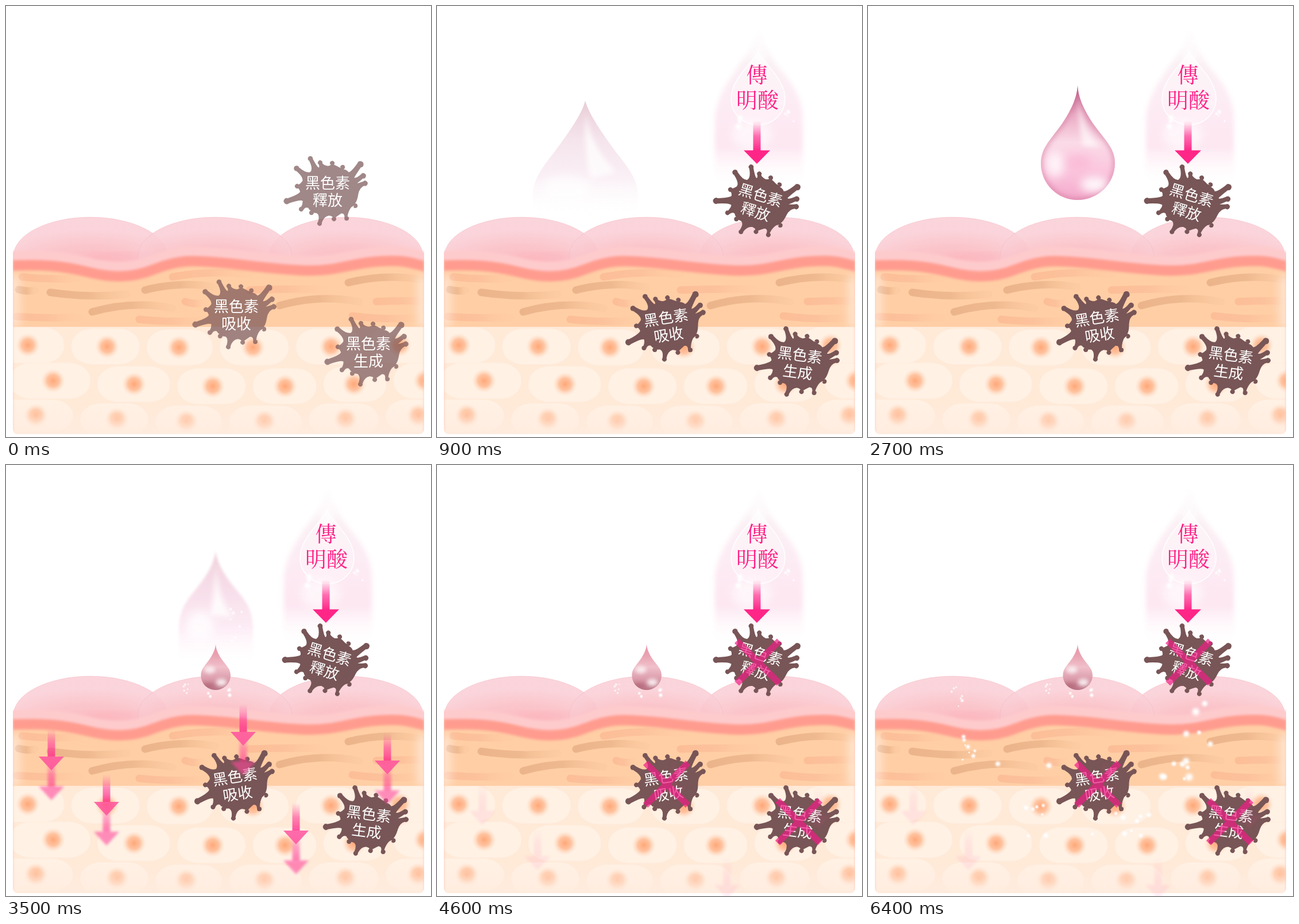
An HTML page for the animation above (7400 ms loop, 740 by 751 pixels).

```html
<!DOCTYPE html>
<html lang="zh-Hant">
<head>
<meta charset="utf-8">
<title>傳明酸</title>
<style>
html, body { margin: 0; width: 100%; height: 100%; overflow: hidden; background: #fff; }
svg { display: block; width: 740px; height: 751px; }
.label { font: 26px "Noto Sans CJK TC", "Noto Sans CJK SC", "Noto Sans CJK JP", sans-serif; fill: #fff; text-anchor: middle; }
.title { font: 500 37px "Noto Serif CJK TC", "Noto Serif CJK SC", "Noto Serif CJK JP", "Noto Serif", serif; fill: #ff1f85; text-anchor: middle; }
</style>
</head>
<body>
<svg id="stage" viewBox="0 0 740 751" xmlns="http://www.w3.org/2000/svg"></svg>
<script>
const LOOP = 7400;
const stage = document.getElementById('stage');
const $ = id => document.getElementById(id);
const group = (id, body, attrs = '') => `<g id="${id}" ${attrs}>${body}</g>`;

// Stops: "color" or "color/opacity", evenly spaced.
const stops = list => list.map((s, i) => {
  const [color, alpha = 1] = s.split('/');
  return `<stop offset="${i / (list.length - 1)}" stop-color="${color}" stop-opacity="${alpha}"/>`;
}).join('');
const across = (id, ...s) => `<linearGradient id="${id}">${stops(s)}</linearGradient>`;
const down = (id, ...s) => `<linearGradient id="${id}" x2="0" y2="1">${stops(s)}</linearGradient>`;
const radial = (id, attrs, ...s) => `<radialGradient id="${id}" ${attrs}>${stops(s)}</radialGradient>`;
const blur = n => `<filter id="blur${n}" x="-60%" y="-60%" width="220%" height="220%"><feGaussianBlur stdDeviation="${n}"/></filter>`;
const wipe = (id, ...s) => `<linearGradient id="${id}" gradientUnits="userSpaceOnUse" x1="0" x2="0">${stops(s)}</linearGradient>
  <mask id="${id}Mask" maskUnits="userSpaceOnUse" x="0" y="0" width="740" height="751"><rect width="740" height="751" fill="url(#${id})"/></mask>`;

const defs = `<defs>
  ${[1, 2, 4, 8].map(blur).join('')}
  ${radial('dome', 'cx=".5" cy=".85" r=".62"', '#fbb6bb', '#fabfc5', '#fad0d7')}
  ${radial('nucleus', '', '#ffa777', '#ffb78e/.8', '#ffd9bf/0')}
  ${radial('glow', '', '#fff', '#fff/.75', '#fff/.2', '#fff/0')}
  ${across('dark', '#ecb48a', '#efb98f', '#f8c59b/.3')}
  ${across('light', '#fcbe97', '#fcc29c', '#ffcaa2/.3')}
  ${down('floor', '#ffecdf/0', '#ffecdf/.9')}
  ${down('beam', '#fff', '#fbf0f4', '#fdebf4', '#fde6f1', '#fff/0')}
  ${down('shaft', '#ff5fa8/0', '#ff4a9d/.8', '#ff2688')}
  ${down('pale', '#e9ccd7', '#f5e4eb', '#faf0f6', '#fff/0')}
  ${down('mist', '#f0cfda', '#f7dde8', '#fdebf5', '#fff/0')}
  ${down('rose', '#b94f7c', '#eaa9c3', '#fbdbe7', '#fbc6de', '#f3a9cb')}
  ${down('deep', '#ee8fa5', '#e9a3b2', '#f0c0ca', '#dc9dac', '#bb7686')}
  ${wipe('wipeOut', '#000', '#fff')}
  ${wipe('wipeIn', '#fff', '#000')}
  <clipPath id="block"><path d="M12 400H728V736Q728 746 718 746H22Q12 746 12 736Z"/></clipPath>
  <path id="drop" d="M365 138C366 158 374 178 392 205C412 233 430 247 430 274C430 310 400 338 365 338S301 310 301 274C301 247 318 233 338 205C356 178 364 158 365 138Z"/>
  <clipPath id="inDrop"><use href="#drop"/></clipPath>
  <g id="arrow"><path d="M-6.5-72H6.5V-23H-6.5Z" fill="url(#shaft)"/><path d="M-22-24H22L0 0Z" fill="#ff4a9c"/></g>
</defs>`;

function random(seed) {
  return () => {
    seed = (seed * 16807) % 2147483647;
    return seed / 2147483647;
  };
}

// Glowing dots strewn around a centre.
function strew(x, y, w, h, count, size) {
  const rnd = random(Math.round(x * 31 + y * 7));
  rnd();
  let out = '';
  for (let i = 0; i < count; i++) {
    const cx = x + (rnd() * 2 - 1) * w, cy = y + (rnd() * 2 - 1) * h;
    out += `<circle cx="${cx.toFixed(1)}" cy="${cy.toFixed(1)}" r="${(size * (.5 + .8 * rnd())).toFixed(1)}" fill="url(#glow)"/>`;
  }
  return out;
}

const shine = (x, y, rx, ry, alpha, color = '#fff') =>
  `<ellipse cx="${x}" cy="${y}" rx="${rx}" ry="${ry}" fill="${color}" opacity="${alpha}" filter="url(#blur8)"/>`;

// Nucleus positions fix the cells: each wall lies midway between neighbours.
function cellRow(xs, y, sag, half) {
  return xs.map((x, i) => {
    const cy = y + sag * Math.sin(Math.PI * i / 5);
    const l = i ? (xs[i - 1] + x) / 2 + 7 : x - 75;
    const r = i < 5 ? (x + xs[i + 1]) / 2 - 6 : x + 75;
    return `<rect x="${l}" y="${cy - half}" width="${r - l}" height="${half * 2}" rx="36" ry="29" fill="#fff1e4" stroke="#ffeee0"/>
      <circle cx="${x}" cy="${cy}" r="21" fill="url(#nucleus)"/>`;
  }).join('');
}

function skin() {
  const dome = x => `<path d="M${x - 134} 436A134 68 0 0 1 ${x + 134} 436V462H${x - 134}Z"
    fill="url(#dome)" fill-opacity=".9" stroke="#f3b3c0" stroke-opacity=".5"/>`;
  const wave = 'M0 452C60 448 100 452 140 462S215 475 260 457S330 443 370 446S480 460 530 460S600 447 650 444S710 448 740 456';
  const band = (dy, width, color) => `<path transform="translate(0 ${dy})" d="${wave}"
    fill="none" stroke="${color}" stroke-width="${width}" filter="url(#blur2)"/>`;
  const fibre = paint => ([x, y, len, bend]) =>
    `<path d="M${x} ${y}q${len / 2} ${bend} ${len} ${bend / 3}" stroke="url(#${paint})"/>`;
  const light = [[28, 472, 100, 6], [290, 472, 135, -12], [424, 495, 130, -3], [232, 546, 113, 6],
    [18, 541, 110, 4], [312, 515, 32, 6], [645, 515, 90, -2], [603, 540, 120, 8]];
  const dark = [[22, 494, 28, 4], [77, 499, 133, 10], [150, 533, 140, -20], [242, 495, 122, -16],
    [476, 522, 139, -20], [596, 482, 126, -16]];
  return dome(147) + dome(592) + dome(364) + shine(185, 438, 52, 5, .5, '#ff9fac') +
    `<g clip-path="url(#block)">
      ${band(-14, 20, '#fecbcc')}
      <path d="${wave}V560H0Z" fill="#ffcea5"/>
      <g fill="none" stroke-width="13" stroke-linecap="round">
        ${light.map(fibre('light')).join('')}${dark.map(fibre('dark')).join('')}</g>
      ${band(1, 18, '#ff9c8f')}
      <path d="M12 470V560M728 470V560" stroke="#fff" stroke-width="24" opacity=".45" filter="url(#blur8)"/>
      <path d="M0 559H740V751H0Z" fill="#ffe9d7"/>
      <svg y="559" width="740" height="192" viewBox="0 559 740 192">
        ${cellRow([38, 176, 301, 430, 566, 685], 591, 4, 31)}
        ${cellRow([82, 223, 360, 486, 606, 730], 653, 10, 31)}
        ${cellRow([52, 193, 314, 450, 591, 718], 714, 11, 28)}
      </svg>
      <rect x="12" y="690" width="716" height="56" fill="url(#floor)"/>
      <path d="M12 440V746M728 440V746" stroke="#ffc9bd" stroke-width="3" opacity=".6" filter="url(#blur1)"/>
    </g>`;
}

// Blob with knobbed spikes; tips run clockwise from the left.
function splatPath() {
  const tips = [[-71, 17], [-53, -9], [-54, -40], [-30, -57], [-13, -50], [8, -49], [26, -42], [57, -47],
    [62, -27], [65, -14], [48, 25], [33, 47], [11, 48], [-14, 56], [-28, 37], [-46, 31]];
  const core = (a, k = 1) => [3 + 53 * k * Math.cos(a), 45 * k * Math.sin(a) - 1];
  const fmt = p => p.map(v => v.toFixed(1)).join(' ');
  const angles = tips.map(([x, y]) => Math.atan2(y, x));
  const valley = i => {
    const a = angles[i], b = angles[(i + 1) % tips.length];
    return core(a + ((b - a + 2 * Math.PI) % (2 * Math.PI)) / 2, .96);
  };
  let d = 'M' + fmt(valley(tips.length - 1));
  tips.forEach(([x, y], i) => {
    const c = Math.cos(angles[i]), s = Math.sin(angles[i]);
    const r = 4 + Math.max(0, Math.hypot(x, y) - 62) / 8;
    const [bx, by] = core(angles[i]);
    const side = (px, py, w) => [px - s * w, py + c * w];
    const nx = x - c * r * .5, ny = y - s * r * .5, w = r * .85;
    d += `Q${fmt(side(bx, by, -w))} ${fmt(side(nx, ny, -w))}A${r} ${r} 0 1 1 ${fmt(side(nx, ny, w))}
      Q${fmt(side(bx, by, w))} ${fmt(valley(i))}`;
  });
  return d + 'Z';
}

const SPLAT = splatPath();
const splat = (x, y, turn, word, alpha = 1) => `<g transform="translate(${x} ${y}) rotate(${turn})">
  <path d="${SPLAT}" fill="#785556" fill-opacity="${alpha}"/>
  <text class="label" y="-5.5">黑色素</text><text class="label" y="24.5">${word}</text></g>`;

const beam = `<path d="M560 33C563 62 582 92 606 120C628 148 637 170 637 200V315H484V200C484 170 500 140 522 108C546 76 557 62 560 33Z"
    fill="url(#beam)" filter="url(#blur4)"/>
  ${shine(560, 95, 9, 40, .8)}${shine(548, 225, 34, 26, .6)}
  <path d="M559 79C563 95 606 125 606 161C606 188 585 207 559 207S512 188 512 161C512 125 555 95 559 79Z"
    fill="#fff" fill-opacity=".25" stroke="#fff" stroke-width="1.5"/>
  ${strew(611, 189, 10, 12, 5, 4)}${strew(525, 230, 25, 35, 3, 7)}
  <path d="M550.5 200H563.5V253H550.5Z" fill="url(#shaft)"/><path d="M534 251.5H580L557 275Z" fill="#ff2688"/>
  <text class="title" x="557" y="133.5">傳</text><text class="title" x="558" y="177.5">明酸</text>`;

const leftDrop = `<path d="M258 165C265 190 290 225 312 255C336 285 350 305 350 330V366H167V330C167 305 180 285 204 255C226 225 252 190 258 165Z" fill="url(#pale)"/>
  <path d="M260 185C262 225 285 260 310 290L268 300C258 265 256 220 260 185Z" fill="#fff" opacity=".75" filter="url(#blur4)"/>
  ${shine(225, 318, 42, 22, .7)}`;

const gloss = `<g clip-path="url(#inDrop)">
  <use href="#drop" fill="none" stroke="#cf6f97" stroke-width="7" opacity=".6" filter="url(#blur4)"/>
  <path d="M367 152C370 195 385 225 404 246L374 244C368 215 365 185 367 152Z" fill="#fff" opacity=".6" filter="url(#blur4)"/>
  ${shine(326, 276, 16, 22, .75)}${shine(366, 272, 22, 14, .6, '#fbb2d3')}${shine(394, 311, 24, 13, .9)}</g>`;

const mistDrop = `<path d="M365 150C368 175 385 198 405 222C424 244 430 262 430 285V350H301V285C301 262 308 244 326 222C346 198 362 175 365 150Z" fill="url(#mist)" filter="url(#blur2)"/>
  <path d="M366 168C366 205 375 240 395 265L355 262C362 230 364 200 366 168Z" fill="#fff" opacity=".8" filter="url(#blur4)"/>
  ${shine(338, 280, 24, 26, .8)}${strew(403, 278, 16, 32, 7, 5)}`;

const smallDrop = `<g transform="translate(219 256.8) scale(.4)"><use href="#drop" fill="url(#deep)"/>
  <g clip-path="url(#inDrop)">${shine(340, 250, 24, 16, .7)}${shine(390, 305, 24, 16, .8)}${shine(330, 320, 30, 14, .5, '#a85a6c')}</g></g>` +
  strew(316, 391, 10, 9, 6, 3) + strew(370, 398, 24, 7, 7, 4);

const arrows = dy => [[79, 532], [175, 611], [413, 489], [505, 661], [664, 539]]
  .map(([x, y]) => `<use href="#arrow" x="${x}" y="${y + dy}"/>`).join('');

const cross = (id, x, y) => group(id, `<path d="M${x - 37} ${y - 37}l74 74m0-74l-74 74" stroke="#f01f86" stroke-width="11.5" opacity=".7"/>`);

const sparkles = [[156, 405, 11, 20, 7, 4], [173, 494, 14, 24, 8, 5], [227, 522, 2, 2, 1, 9], [317, 523, 3, 3, 1, 12],
  [292, 620, 18, 28, 7, 7], [440, 628, 50, 26, 9, 8], [550, 525, 45, 22, 8, 9], [570, 450, 28, 40, 5, 11]]
  .map(s => strew(...s)).join('');

stage.innerHTML = defs + skin() +
  group('beamLayer', beam) +
  group('leftLayer', leftDrop, 'mask="url(#wipeOutMask)"') +
  group('mistLayer', mistDrop) +
  group('bigLayer', `<use href="#drop" fill="url(#rose)"/>${gloss}`, 'mask="url(#wipeInMask)"') +
  group('smallLayer', smallDrop) +
  group('before', splat(560, 323, 0, '釋放', .7) + splat(401, 538, 0, '吸收', .7) + splat(631, 603, 0, '生成', .7)) +
  group('after', splat(559, 344, 17, '釋放') + splat(401, 558, -9, '吸收') + splat(630, 623, 7.5, '生成')) +
  group('arrowsHigh', arrows(0)) +
  group('arrowsMid', arrows(52), 'filter="url(#blur2)"') +
  group('arrowsLow', arrows(95), 'filter="url(#blur2)"') +
  cross('crossRelease', 559, 343.5) + cross('crossAbsorb', 400, 556) + cross('crossMake', 630, 621.5) +
  group('sparkleLayer', sparkles);

// Keys: time, value, time, value ...
function track(t, ...keys) {
  if (t <= keys[0]) return keys[1];
  for (let i = 2; i < keys.length; i += 2) {
    if (t <= keys[i]) {
      const k = (t - keys[i - 2]) / (keys[i] - keys[i - 2]);
      return keys[i - 1] + (keys[i + 1] - keys[i - 1]) * k;
    }
  }
  return keys[keys.length - 1];
}

const FADES = {
  before: [0, 1, 200, .52, 500, 0],
  after: [0, 0, 200, .55, 500, 1],
  beamLayer: [200, 0, 500, 1],
  leftLayer: [700, 0, 900, 1, 1300, .85, 1900, 0],
  bigLayer: [1900, 0, 2100, .35, 2700, 1, 3300, 0],
  mistLayer: [2700, 0, 3200, 1, 3500, .95, 3800, 0],
  smallLayer: [2700, 0, 3200, 1],
  arrowsHigh: [2800, 0, 3300, .9, 3500, .8, 4000, 0],
  arrowsMid: [3000, 0, 3500, .6, 3700, .7, 4200, 0],
  arrowsLow: [3500, 0, 3800, .4, 4200, .09],
  crossAbsorb: [4100, 0, 4200, 1],
  crossMake: [4200, 0, 4400, 1],
  crossRelease: [4400, 0, 4600, 1],
  sparkleLayer: [4600, 0, 5200, 1, 5800, .4, 6400, 1]
};

// The picture moves in holds of 100 or 200 ms.
function hold(t) {
  const fine = t < 500 || (t >= 3200 && t < 4200);
  const step = fine ? 100 : 200;
  const shift = t >= 500 && t < 2800 ? 100 : 0;
  return Math.floor((t - shift) / step) * step + shift;
}

function edge(id, y) {
  $(id).setAttribute('y1', y - 80);
  $(id).setAttribute('y2', y);
}

function render(now) {
  const t = hold(now % LOOP);
  for (const id in FADES) {
    const alpha = track(t, ...FADES[id]);
    $(id).setAttribute('opacity', alpha);
    $(id).style.display = alpha > 0 ? '' : 'none';
  }
  edge('wipeOut', track(t, 900, 150, 1900, 430));
  edge('wipeIn', track(t, 2100, 265, 2700, 440));
}

let start = null;
function loop(now) {
  if (start === null) start = now;
  render(now - start);
  requestAnimationFrame(loop);
}
render(0);
requestAnimationFrame(loop);
</script>
</body>
</html>
```
